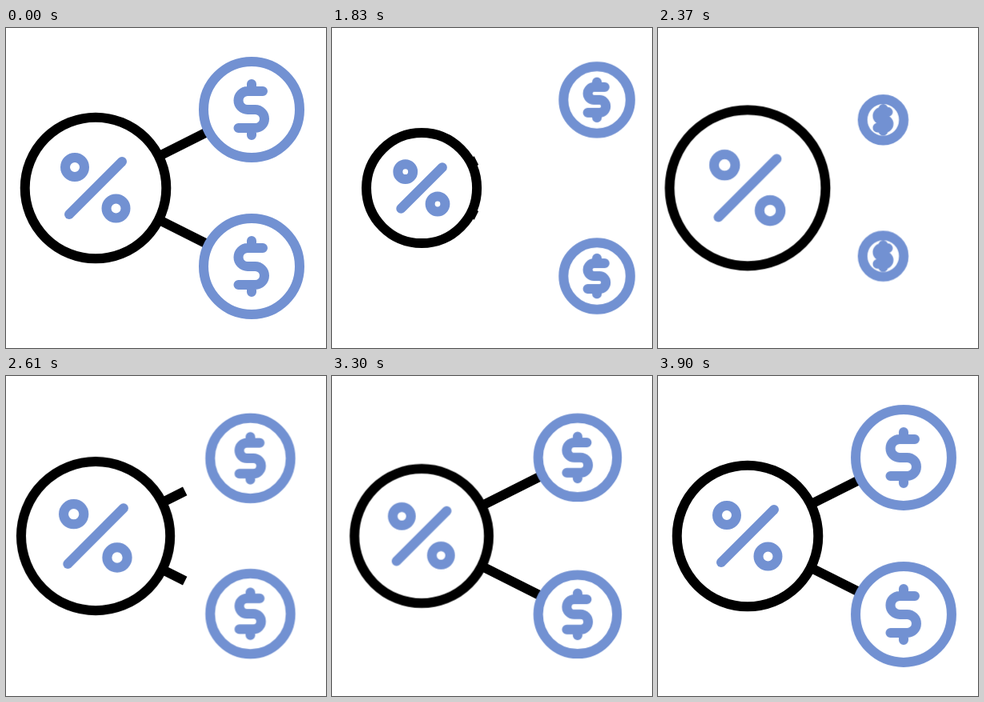
An HTML page for the animation above (3.93 s loop, 400 by 400 pixels).

```html
<!DOCTYPE html>
<html lang="en">
<head>
<meta charset="utf-8">
<title>Commission</title>
<style>
  html, body { margin: 0; width: 100%; height: 100%; overflow: hidden; background: #fff; }
  svg { display: block; width: 100%; height: 100%; }

  svg * {
    fill: none;
    stroke-width: 12px;
    stroke-linecap: round;
    stroke-linejoin: round;
    vector-effect: non-scaling-stroke;
  }
  .black { stroke: #000; }
  .blue { stroke: #7291d2; }
  .disc { fill: #fff; }

  .upper { --x: 195px; --y: -98px; }
  .lower { --x: 195px; --y: 98px; }

  .hub, .link, .fly, .fade, .emerge, .grow {
    animation: 3930ms linear infinite;
  }
  .hub { animation-name: hub; }
  .link { animation-name: link; stroke-linecap: butt; stroke-dasharray: 1 2; }
  .fly { animation-name: fly; }
  .fade { animation-name: fade; }
  .emerge { animation-name: emerge; }
  .grow { animation-name: grow; }

  /* Percent circle: shrink, then a damped bounce */
  @keyframes hub {
    0%, 38.17% { transform: scale(1); animation-timing-function: cubic-bezier(.37, 0, .63, 1); }
    51.15% { transform: scale(.7); animation-timing-function: cubic-bezier(.37, 0, .63, 1); }
    62.6% { transform: scale(1.145); animation-timing-function: cubic-bezier(.37, 0, .63, 1); }
    73.03% { transform: scale(.84); animation-timing-function: cubic-bezier(.37, 0, .63, 1); }
    90.59%, 100% { transform: scale(1); }
  }

  /* Connectors retract into the hub and extend again */
  @keyframes link {
    0%, 38.93% { stroke-dashoffset: .2; animation-timing-function: cubic-bezier(.37, 0, .63, 1); }
    49.62%, 61.07% { stroke-dashoffset: .75; animation-timing-function: cubic-bezier(.37, 0, .63, 1); }
    70.74%, 100% { stroke-dashoffset: .2; }
  }

  /* Leaving coins */
  @keyframes fly {
    0%, 38.93% {
      transform: translate(var(--x), var(--y));
      animation-timing-function: cubic-bezier(.33, 0, .67, .33);
    }
    53.94%, 100% { transform: translate(calc(var(--x) * 1.478), calc(var(--y) * 1.478)); }
  }
  @keyframes fade {
    0%, 38.93% {
      transform: scale(1);
      visibility: visible;
      animation-timing-function: cubic-bezier(.47, 0, .745, .715);
    }
    53.94%, 100% { transform: scale(0); visibility: hidden; }
  }

  /* Arriving coins */
  @keyframes emerge {
    0%, 45.8% {
      transform: translate(0, 0);
      animation-timing-function: cubic-bezier(.39, .575, .565, 1);
    }
    68.7%, 100% { transform: translate(var(--x), var(--y)); }
  }
  @keyframes grow {
    0%, 58.52% { transform: scale(.4); animation-timing-function: cubic-bezier(.37, 0, .63, 1); }
    72.77% { transform: scale(1.145); animation-timing-function: cubic-bezier(.7, 0, .6, 1); }
    85.75% { transform: scale(.805); animation-timing-function: cubic-bezier(.37, 0, .63, 1); }
    99.75%, 100% { transform: scale(1); }
  }
</style>
</head>
<body>
<svg viewBox="0 0 400 400">
  <defs>
    <g id="coin" class="blue">
      <circle class="disc" r="60"/>
      <path d="M14-23H-5a11.5 11.5 0 0 0 0 23H4.5a11.5 11.5 0 0 1 0 23H-16.5M0-32V-23M0 23V32"/>
    </g>
  </defs>
  <g transform="translate(112 200)">
    <path class="link black" pathLength="1" d="M0 0L195-98"/>
    <path class="link black" pathLength="1" d="M0 0L195 98"/>
    <g class="upper">
      <g class="emerge"><g class="grow"><use href="#coin"/></g></g>
      <g class="fly"><g class="fade"><use href="#coin"/></g></g>
    </g>
    <g class="lower">
      <g class="emerge"><g class="grow"><use href="#coin"/></g></g>
      <g class="fly"><g class="fade"><use href="#coin"/></g></g>
    </g>
    <g class="hub">
      <circle class="disc black" r="88.3"/>
      <g class="blue">
        <path d="M-33 33L33-33"/>
        <circle cx="-26" cy="-26" r="12"/>
        <circle cx="25.5" cy="25.5" r="12"/>
      </g>
    </g>
  </g>
</svg>
</body>
</html>
```
